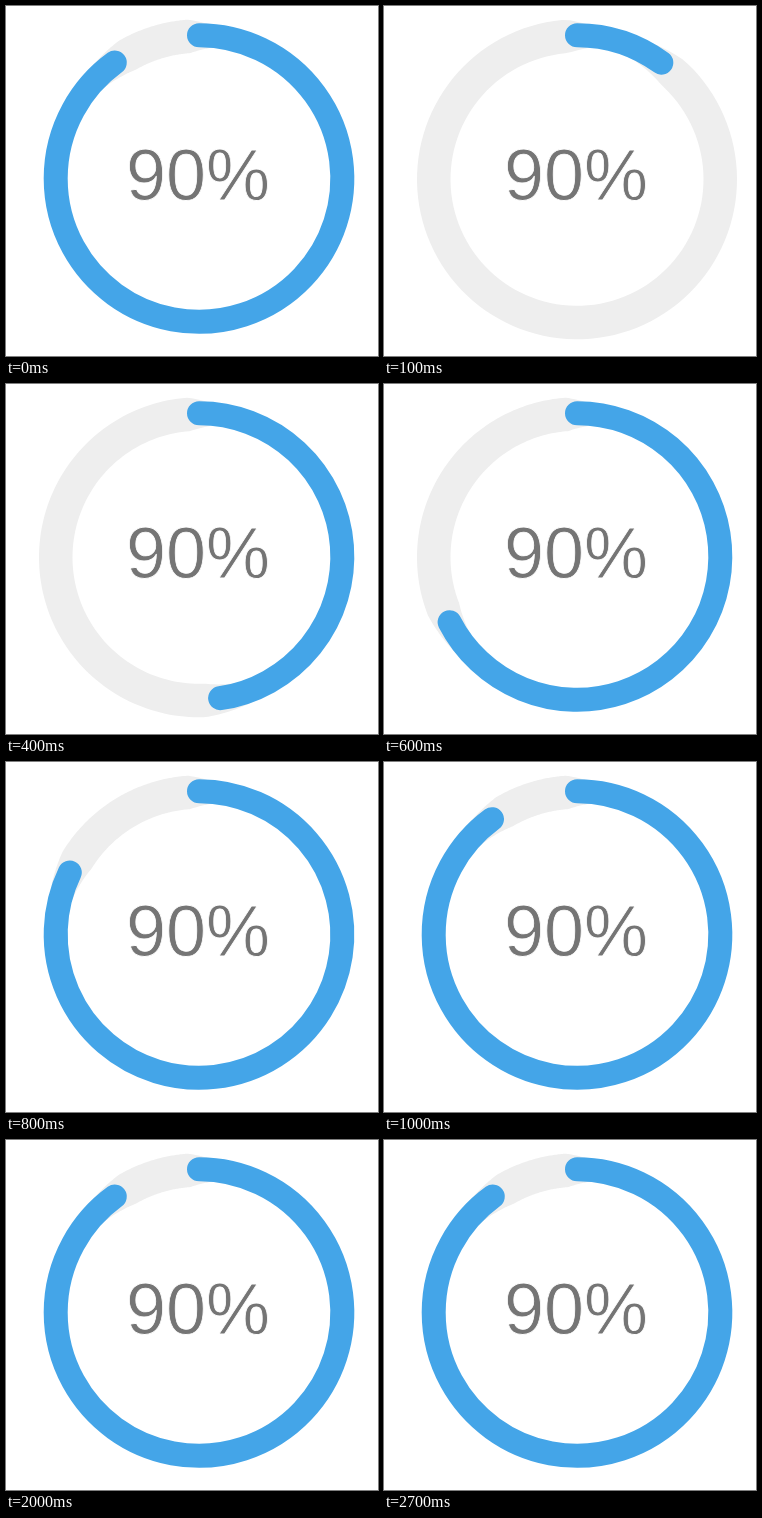
Animation, 372 px wide and 350 px high, one loop 2.8 s. Source, as an HTML page:

```html
<!DOCTYPE html>
<html lang="en">
<head>
<meta charset="utf-8">
<title>Progress ring</title>
<style>
html, body { margin: 0; width: 100%; height: 100%; overflow: hidden; background: #fff; }
svg { display: block; }
text { font: 72px "Liberation Sans", Arial, sans-serif; fill: #757575; stroke: #fff; stroke-width: .8px; }
</style>
</head>
<body>
<svg width="372" height="350" viewBox="0 0 372 350">
  <path id="track" fill="#eee"/>
  <path id="bar" fill="none" stroke="#44a5e8" stroke-width="24" stroke-linecap="round"/>
  <text x="120" y="193.5">90%</text>
</svg>
<script>
const LOOP = 2800, STEP = 100, FULL = 324;
const CX = 193, CY = 172.5, R = 143.3;
const track = document.getElementById('track');
const bar = document.getElementById('bar');

const point = (deg, r, cy = CY) => {
  const a = deg * Math.PI / 180;
  return (CX + r * Math.sin(a)).toFixed(2) + ' ' + (cy - r * Math.cos(a)).toFixed(2);
};
const clamp = v => Math.min(1, Math.max(0, v));

// Degrees filled: a decelerating sweep that rests at 90%.
function sweep(t) {
  if (t < STEP) return FULL;
  return FULL * (1 - Math.pow(1 - clamp((t - 30) / 985), 1.6));
}

// The free part of the ring, narrowing to the bar's width at both ends.
function trackPath(end) {
  const from = end - 12, to = 366, n = 120;
  const outer = [], inner = [];
  for (let i = 0; i <= n; i++) {
    const a = from + (to - from) * i / n;
    const grow = Math.min(clamp((a - from) / 18), clamp((to - a) / 10));
    outer.push(point(a, 154 + 6 * grow, 173.3));
    inner.unshift(point(a, 132.5 - 6 * grow, 173.3));
  }
  return 'M' + outer.concat(inner).join('L') + 'Z';
}

function draw(now) {
  const t = Math.floor((now % LOOP) / STEP) * STEP;
  const end = sweep(t);
  track.setAttribute('d', trackPath(end));
  bar.setAttribute('d', `M${point(0, R)}A${R} ${R} 0 ${end > 180 ? 1 : 0} 1 ${point(end, R)}`);
}

const start = performance.now();
function tick() {
  draw(performance.now() - start);
  requestAnimationFrame(tick);
}
tick();
</script>
</body>
</html>
```
